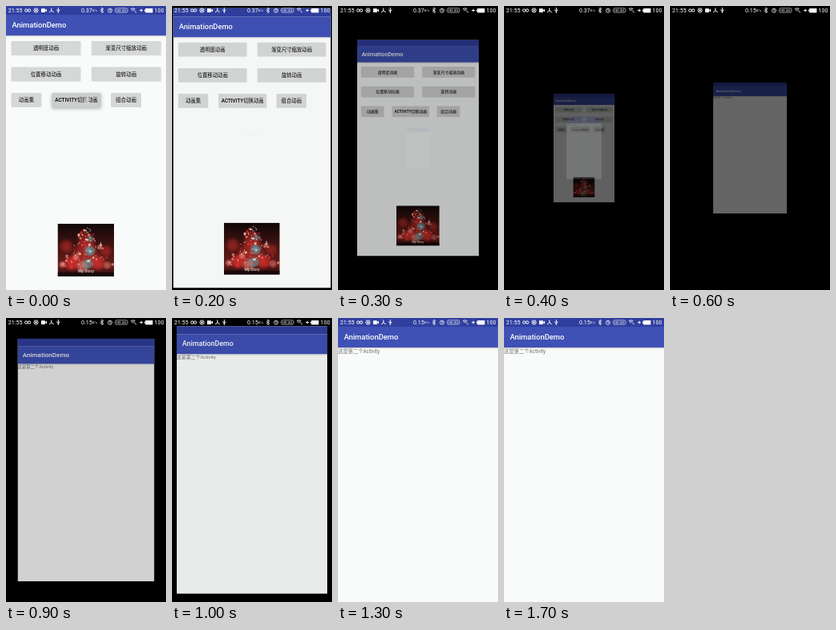
Write an HTML page with a canvas that moves like this. It is 200 by 356 pixels and loops after 1.8 s.

```html
<!DOCTYPE html>
<html lang="zh-CN">
<head>
<meta charset="utf-8">
<title>AnimationDemo</title>
<style>
  html, body { margin: 0; width: 100%; height: 100%; overflow: hidden; background: #000; }
  canvas { display: block; width: 100%; height: 100%; }
</style>
</head>
<body>
<canvas id="stage" width="200" height="356"></canvas>
<script>
const W = 200, H = 356, LOOP = 1800, STEP = 100;
const EXIT = { start: 170, duration: 400 };
const ENTER = { start: 163, duration: 1000 };
const FONT = 'Roboto, "Noto Sans CJK SC", "Noto Sans CJK", sans-serif';
const stage = document.getElementById('stage').getContext('2d');
const layerCanvas = document.createElement('canvas');
layerCanvas.width = W;
layerCanvas.height = H;
const layer = layerCanvas.getContext('2d');

function rect(c, x, y, w, h, color) {
  c.fillStyle = color;
  c.fillRect(x, y, w, h);
}

function disc(c, x, y, r, color) {
  c.fillStyle = color;
  c.beginPath();
  c.arc(x, y, r, 0, Math.PI * 2);
  c.fill();
}

function ring(c, x, y, r) {
  c.beginPath();
  c.arc(x, y, r, 0, Math.PI * 2);
  c.stroke();
}

// Soft light spot; rgb is a "r,g,b" string.
function glow(c, x, y, r, rgb, alpha) {
  const g = c.createRadialGradient(x, y, 0, x, y, r);
  g.addColorStop(0, `rgba(${rgb},${alpha})`);
  g.addColorStop(0.5, `rgba(${rgb},${alpha * 0.75})`);
  g.addColorStop(1, `rgba(${rgb},0)`);
  disc(c, x, y, r, g);
}

function path(c, points, fill) {
  c.beginPath();
  points.forEach(([x, y]) => c.lineTo(x, y));
  fill ? c.fill() : c.stroke();
}

function label(c, text, x, y, size, color, weight = 400, align = 'left') {
  c.font = `${weight} ${size}px ${FONT}`;
  c.textAlign = align;
  c.fillStyle = color;
  c.fillText(text, x, y);
}

function drawFrame(c) {
  rect(c, 0, 0, W, H, '#f9fafa');
  const shade = c.createLinearGradient(0, 37, 0, 39.5);
  shade.addColorStop(0, 'rgba(0,0,0,.16)');
  shade.addColorStop(1, 'rgba(0,0,0,0)');
  rect(c, 0, 37, W, 2.5, shade);
  rect(c, 0, 0, W, 11, '#303f9f');
  rect(c, 0, 11, W, 26, '#3f51b5');
  label(c, 'AnimationDemo', 7.4, 26.7, 9.45, '#fff', 500);
}

function button(c, text, x, y, w, pressed) {
  c.save();
  if (pressed) {
    c.shadowColor = 'rgba(0,0,0,.3)';
    c.shadowBlur = 4;
    c.shadowOffsetY = 1.5;
  }
  c.fillStyle = pressed ? '#cbcccc' : '#d6d7d7';
  c.beginPath();
  c.roundRect(x, y, w, 18, 1);
  c.fill();
  c.restore();
  label(c, text, x + w / 2, y + 11.4, 6.45, '#000', 500, 'center');
}

function photo(c) {
  const red = '225,50,45', pink = '255,150,135', teal = '75,175,185', white = '255,235,220';
  c.save();
  c.translate(64.5, 273);
  c.beginPath();
  c.rect(0, 0, 70.5, 66);
  c.clip();
  const base = c.createLinearGradient(0, 0, 0, 66);
  base.addColorStop(0, '#120708');
  base.addColorStop(0.5, '#4a1614');
  base.addColorStop(0.82, '#6a1c1b');
  base.addColorStop(1, '#1a0a0b');
  rect(c, 0, 0, 71, 66, base);
  for (const [x, y, r, tone, alpha] of [
    [36, 22, 13, red, 0.6], [35, 38, 19, red, 0.6], [11, 28, 10, red, 0.5],
    [60, 34, 9, red, 0.45], [18, 49, 11, red, 0.9], [31, 53, 9, pink, 0.6],
    [50, 49, 11, red, 0.8], [62, 52, 6, pink, 0.5], [40, 34, 8, teal, 0.85],
    [41, 19, 5, teal, 0.6], [38, 50, 8, teal, 0.75], [23, 42, 5, pink, 0.7],
    [6, 51, 5, pink, 0.7], [53, 29, 4, pink, 0.7]
  ]) glow(c, x, y, r, tone, alpha);

  let seed = 17;
  const random = () => (seed = (seed * 16807) % 2147483647) / 2147483647;
  const tones = [red, pink, white];
  for (let i = 0; i < 54; i++) {
    const y = 8 + random() * 48;
    const x = 37 + (random() - 0.5) * (8 + y * 1.1);
    glow(c, x, y, 0.9 + random() * 1.7, tones[i % 3], 0.85);
  }
  // Strings of lights winding down the tree
  for (let i = 0; i < 33; i++) {
    const y = 5 + i * 1.35;
    disc(c, 37 + Math.sin(i * 0.75) * (1 + y * 0.42), y, 0.55, '#ffe9d8');
  }
  rect(c, 0, 61, 71, 5, 'rgba(12,5,6,.6)');
  label(c, 'My Story', 35.5, 61, 5, '#fff', 400, 'center');
  c.restore();
}

function drawMenu(c, pressed) {
  drawFrame(c);
  button(c, '透明度动画', 6.5, 44, 87);
  button(c, '渐变尺寸缩放动画', 106.8, 44, 87);
  button(c, '位置移动动画', 6.5, 76.5, 87);
  button(c, '旋转动画', 106.8, 76.5, 87);
  button(c, '动画集', 6.5, 109, 38);
  button(c, 'ACTIVITY切换动画', 57.5, 109, 61, pressed);
  if (pressed) glow(c, 101, 118, 5, '225,225,225', 0.75);
  button(c, '组合动画', 131, 109, 38);
  photo(c);
}

function drawSecond(c) {
  drawFrame(c);
  label(c, '这是第二个Activity', 0, 43.6, 6.3, '#707070');
}

function statusIcons(c, speed) {
  c.strokeStyle = '#fff';
  c.lineWidth = 1;
  label(c, '21:55', 2.8, 8.2, 7.1, '#fff');
  ring(c, 25.2, 5.5, 1.7);
  ring(c, 29, 5.5, 1.7);
  ring(c, 37.5, 5.5, 2.6);
  disc(c, 37.5, 5.5, 1.2, '#fff');
  rect(c, 44, 3.2, 4.8, 4.8, '#fff');
  path(c, [[48.5, 5.6], [51, 3.6], [51, 7.6]], true);
  path(c, [[54, 8], [56.8, 5.8], [59.8, 8]]);
  path(c, [[56.8, 2.5], [56.8, 6]]);
  path(c, [[65.3, 2], [65.3, 9]]);
  path(c, [[63.3, 4.5], [65.3, 7], [67.3, 4.5]]);

  label(c, speed, 94, 8.2, 7.1, '#fff');
  label(c, 'K/s', 107.8, 6.5, 4, '#fff');
  c.lineWidth = 0.8;
  path(c, [[118, 3.7], [121.8, 7], [120, 8.8], [120, 2], [121.8, 3.8], [118, 7]]);
  ring(c, 130, 5.7, 2.5);
  path(c, [[130, 4], [130, 5.9], [131.3, 5.9]]);
  c.lineWidth = 0.6;
  c.beginPath();
  c.roundRect(136.5, 2.8, 15.5, 5.3, 2);
  c.stroke();
  label(c, 'HD 4G', 144.2, 7, 4.4, '#fff', 400, 'center');
  c.lineWidth = 0.9;
  path(c, [[156, 3.8], [158.5, 2.8], [161.5, 3.8]]);
  path(c, [[157, 5.4], [159, 4.8], [160.5, 5.6]]);
  path(c, [[160.5, 6], [163, 8.3]]);
  rect(c, 167.3, 5, 3.6, 1, '#fff');
  rect(c, 168.6, 3.7, 1, 3.6, '#fff');
  rect(c, 173, 4.7, 1.2, 2, '#fff');
  rect(c, 174.2, 3, 9.2, 5.4, '#fff');
  label(c, '100', 185.6, 8.2, 7.1, '#fff');
}

function progress(time, { start, duration }) {
  const x = Math.min(1, Math.max(0, (time - start) / duration));
  return (1 - Math.cos(Math.PI * x)) / 2;
}

// Draws a whole window at its final size, then blends it as one group.
function drawWindow(draw, scale, alpha) {
  if (scale <= 0 || alpha <= 0) return;
  layer.clearRect(0, 0, W, H);
  layer.save();
  layer.translate(W / 2 * (1 - scale), H / 2 * (1 - scale));
  layer.scale(scale, scale);
  layer.beginPath();
  layer.rect(0, 0, W, H);
  layer.clip();
  draw(layer);
  layer.restore();
  stage.globalAlpha = alpha;
  stage.drawImage(layerCanvas, 0, 0);
  stage.globalAlpha = 1;
}

function render(time) {
  const exit = progress(time, EXIT);
  const enter = progress(time, ENTER);
  rect(stage, 0, 0, W, H, '#000');
  drawWindow(c => drawMenu(c, time < 200), 1 - exit, 1 - exit);
  drawWindow(drawSecond, 0.1 + 0.9 * enter, enter);
  statusIcons(stage, time < 500 ? '0.37' : '0.15');
}

const start = performance.now();
function tick() {
  const time = (performance.now() - start) % LOOP;
  render(Math.floor(time / STEP) * STEP);
  requestAnimationFrame(tick);
}
tick();
</script>
</body>
</html>
```
